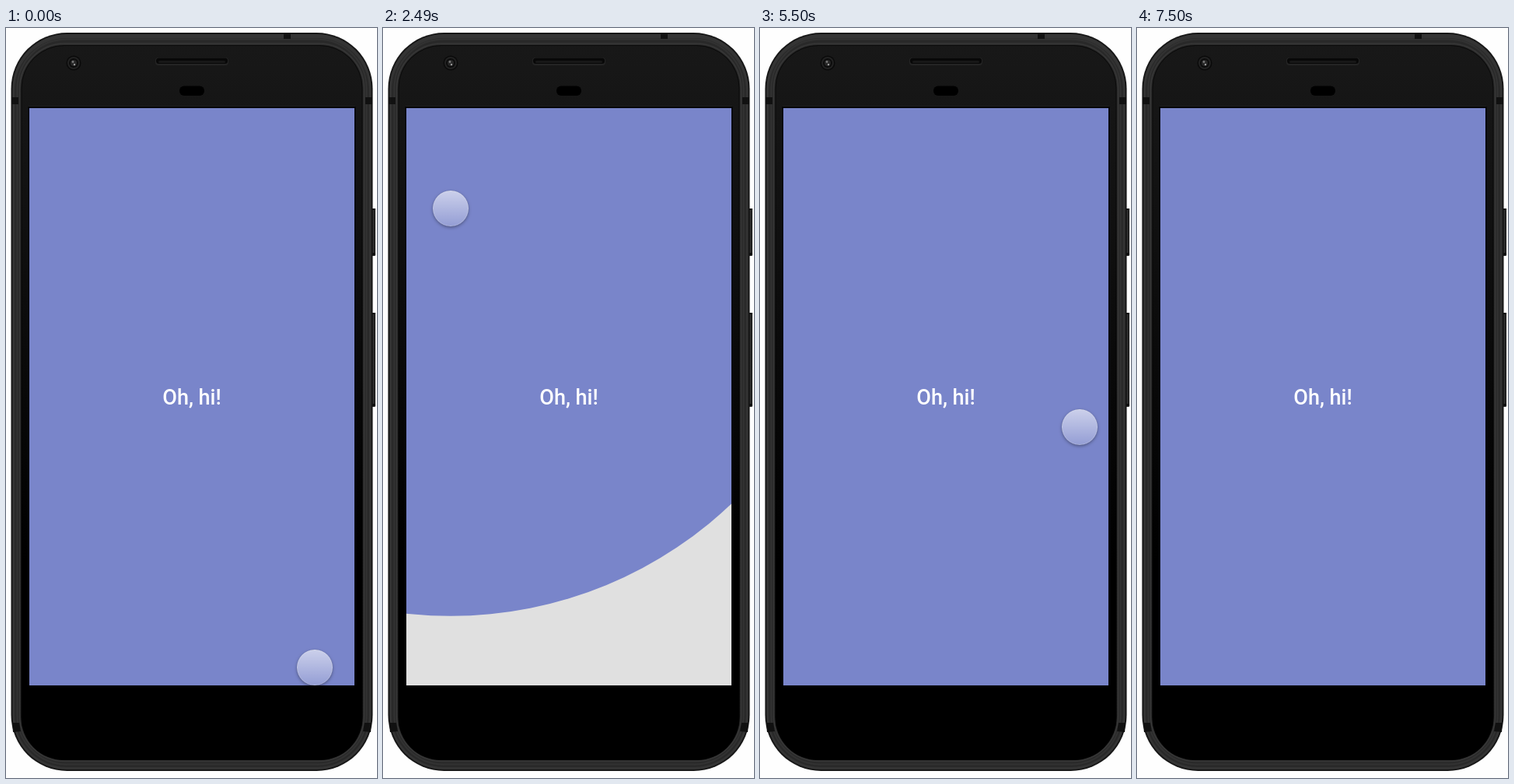
Animation, 477 px wide and 964 px high, one loop 8430 ms. Source, as an HTML page with a canvas:

```html
<!DOCTYPE html>
<html lang="en">
<head>
<meta charset="utf-8">
<title>Circular reveal</title>
<style>
  html, body { margin: 0; width: 100%; height: 100%; overflow: hidden; background: #fefefe; }
  canvas { display: block; width: 477px; height: 964px; }
</style>
</head>
<body>
<canvas id="stage" width="477" height="964"></canvas>
<script>
const WIDTH = 477, HEIGHT = 964, LOOP = 8430, DURATION = 600;
const SCREEN = { left: 30, top: 103, right: 448, bottom: 845 };
const BALL_RADIUS = 23;

// Pointer path: time, x, y
const PATH = [
  [30, 397, 822], [585, 255, 549], [940, 255, 549],
  [1520, 119, 345], [1690, 112, 328], [1830, 112, 328],
  [2090, 87, 232], [2640, 87, 232],
  [3120, 330, 250], [3220, 335, 254], [3580, 415, 404], [3670, 433, 523],
  [4390, 156, 773], [4720, 156, 773],
  [5150, 440, 650], [5450, 411, 513], [6940, 411, 513],
  [7500, 54, 990]
];

// Each tap opens the panel around the pointer or closes it into the corner
const TAPS = [
  { at: 960, open: false, x: 448, y: 845 },
  { at: 2096, open: true, x: 87, y: 232 },
  { at: 3202, open: false, x: 448, y: 845 },
  { at: 4389, open: true, x: 156, y: 773 },
  { at: 5530, open: false, x: 448, y: 845 },
  { at: 6300, open: true, x: 411, y: 513 }
];

const canvas = document.getElementById('stage');
const ctx = canvas.getContext('2d');

function fillRound(c, left, top, right, bottom, radius, fill) {
  c.beginPath();
  c.roundRect(left, top, right - left, bottom - top, radius);
  c.fillStyle = fill;
  c.fill();
}

function strokeRound(c, left, top, right, bottom, radius, color, width = 1) {
  c.beginPath();
  c.roundRect(left, top, right - left, bottom - top, radius);
  c.strokeStyle = color;
  c.lineWidth = width;
  c.stroke();
}

function disc(c, x, y, radius, fill) {
  c.beginPath();
  c.arc(x, y, radius, 0, Math.PI * 2);
  c.fillStyle = fill;
  c.fill();
}

function gradient(c, x0, y0, x1, y1, stops) {
  const g = c.createLinearGradient(x0, y0, x1, y1);
  stops.forEach(([offset, color]) => g.addColorStop(offset, color));
  return g;
}

function paintPhone() {
  const layer = document.createElement('canvas');
  layer.width = WIDTH;
  layer.height = HEIGHT;
  const c = layer.getContext('2d');
  c.fillStyle = '#fefefe';
  c.fillRect(0, 0, WIDTH, HEIGHT);

  for (const [top, bottom] of [[232, 293], [366, 487]]) {
    const side = gradient(c, 470, 0, 475, 0, [[0, '#0b0b0b'], [0.5, '#303030'], [1, '#151515']]);
    fillRound(c, 468, top, 475, bottom, 1.5, side);
    c.fillStyle = '#090909';
    c.fillRect(471, top, 4, 2);
    c.fillRect(471, bottom - 4, 4, 3);
  }

  // Metal rim
  fillRound(c, 6.5, 6, 471.5, 955, 72, '#171717');
  fillRound(c, 8.5, 8, 469.5, 953, 70, '#343434');
  fillRound(c, 11, 13, 467, 950, 67, '#292929');
  strokeRound(c, 14.5, 14.5, 463.5, 946.5, 63, '#323232', 2);
  strokeRound(c, 17.5, 20, 460.5, 942.5, 58, '#373737', 1.5);

  // Antenna bands
  c.fillStyle = '#111';
  c.fillRect(357, 6, 9, 8);
  for (const x of [7, 462]) c.fillRect(x, 89, 9, 9);
  for (const flip of [false, true]) {
    c.save();
    if (flip) { c.translate(478, 0); c.scale(-1, 1); }
    c.beginPath();
    c.moveTo(8, 893);
    c.lineTo(17, 893);
    c.lineTo(19, 904);
    c.lineTo(9, 905);
    c.fill();
    c.restore();
  }

  // Glass front
  const glass = gradient(c, 0, 22, 0, 941, [[0, '#181818'], [0.1, '#151515'], [0.4, '#0b0b0b'], [0.72, '#000'], [1, '#000']]);
  fillRound(c, 19.5, 22, 458.5, 941, 55, glass);
  strokeRound(c, 20, 22.5, 458, 940.5, 55, 'rgba(0,0,0,.55)');

  // Earpiece and sensor
  fillRound(c, 192, 38, 286, 48, 4, '#242424');
  fillRound(c, 193, 38.5, 285, 46, 3.5, '#080808');
  fillRound(c, 196, 42, 282, 45, 1.5, '#171717');
  fillRound(c, 223, 74.5, 255, 87, 6, '#000');

  // Camera
  disc(c, 87, 45, 9.5, '#0a0a0a');
  disc(c, 87, 45, 8, '#222');
  disc(c, 87, 45, 6, '#0c0c0c');
  disc(c, 87, 45, 4, '#272727');
  disc(c, 86, 43.5, 1.4, '#777');
  disc(c, 88, 47, 1.2, '#999');

  c.fillStyle = '#000';
  c.fillRect(28.5, 101, 421, 746);
  c.fillStyle = '#222';
  c.fillRect(29, 100, 420, 0.8);
  return layer;
}

const phone = paintPhone();

// Monotone cubic interpolation along one axis of the path
function along(t, axis) {
  const last = PATH.length - 1;
  if (t <= PATH[0][0]) return PATH[0][axis];
  if (t >= PATH[last][0]) return PATH[last][axis];
  const i = PATH.findIndex(key => key[0] > t) - 1;
  const slope = k => (PATH[k + 1][axis] - PATH[k][axis]) / (PATH[k + 1][0] - PATH[k][0]);
  const tangent = k => {
    if (k === 0) return 0;
    if (k === last) return slope(k - 1);
    const a = slope(k - 1), b = slope(k);
    return a * b > 0 ? 2 * a * b / (a + b) : 0;
  };
  const span = PATH[i + 1][0] - PATH[i][0];
  const u = (t - PATH[i][0]) / span, v = 1 - u;
  return PATH[i][axis] * (1 + 2 * u) * v * v + PATH[i + 1][axis] * u * u * (3 - 2 * u)
    + span * (tangent(i) * u * v * v - tangent(i + 1) * u * u * v);
}

function panelCircle(t) {
  const tap = TAPS.findLast(item => item.at <= t);
  if (!tap) return { x: 239, y: 474, radius: HEIGHT };
  const { x, y } = tap;
  const reach = Math.hypot(
    Math.max(x - SCREEN.left, SCREEN.right - x),
    Math.max(y - SCREEN.top, SCREEN.bottom - y)
  );
  const progress = Math.min(1, (t - tap.at) / DURATION);
  const eased = 0.5 - 0.5 * Math.cos(Math.PI * progress);
  if (tap.open && progress === 1) return { x, y, radius: HEIGHT };
  return { x, y, radius: reach * (tap.open ? eased : 1 - eased) };
}

function drawScreen(t) {
  const { left, top, right, bottom } = SCREEN;
  const panel = panelCircle(t);
  ctx.save();
  ctx.beginPath();
  ctx.rect(left, top, right - left, bottom - top);
  ctx.clip();
  ctx.fillStyle = '#e0e0e0';
  ctx.fillRect(left, top, right - left, bottom - top);
  disc(ctx, panel.x, panel.y, panel.radius, '#7985ca');
  ctx.clip();
  ctx.fillStyle = '#fff';
  ctx.font = '500 27px Roboto, sans-serif';
  ctx.textAlign = 'center';
  ctx.fillText('Oh, hi!', 239, 484);
  ctx.restore();
}

function drawBall(x, y) {
  if (y - BALL_RADIUS > HEIGHT) return;
  // The shadow stays outside the translucent disc
  ctx.save();
  ctx.beginPath();
  ctx.rect(0, 0, WIDTH, HEIGHT);
  ctx.arc(x, y, BALL_RADIUS, 0, Math.PI * 2);
  ctx.clip('evenodd');
  ctx.shadowColor = 'rgba(0,0,0,.4)';
  ctx.shadowBlur = 4;
  ctx.shadowOffsetY = 1.5;
  disc(ctx, x, y, BALL_RADIUS - 0.3, '#000');
  ctx.restore();

  const shine = gradient(ctx, 0, y - BALL_RADIUS, 0, y + BALL_RADIUS,
    [[0, 'rgba(255,255,255,.62)'], [1, 'rgba(255,255,255,.2)']]);
  disc(ctx, x, y, BALL_RADIUS, shine);
  ctx.beginPath();
  ctx.arc(x, y, BALL_RADIUS - 0.5, 0, Math.PI * 2);
  ctx.strokeStyle = 'rgba(255,255,255,.2)';
  ctx.lineWidth = 1;
  ctx.stroke();
}

function render(now) {
  const t = now % LOOP;
  ctx.drawImage(phone, 0, 0);
  drawScreen(t);
  drawBall(along(t, 1), along(t, 2));
}

let start;
function tick(now) {
  start ??= now;
  render(now - start);
  requestAnimationFrame(tick);
}

render(0);
requestAnimationFrame(tick);
</script>
</body>
</html>
```
